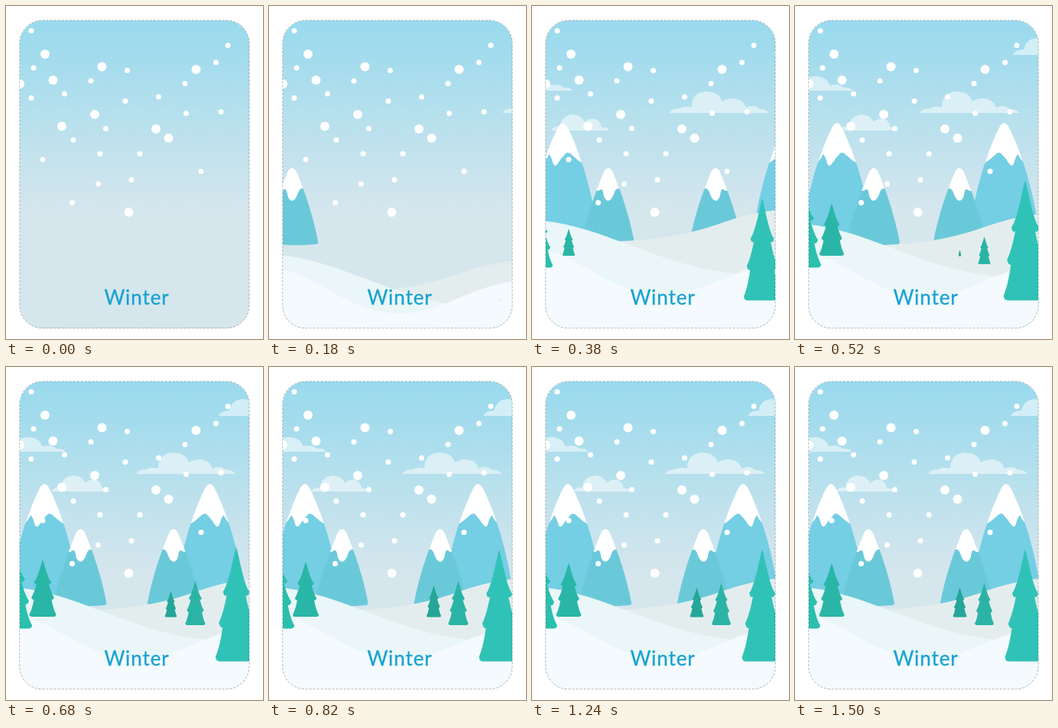
Write an HTML page that moves like this. It is 336 px wide and 436 px high and loops after 2.62 s.

```html
<!DOCTYPE html>
<html lang="en">
<head>
<meta charset="utf-8">
<title>Winter</title>
<style>
  html, body { margin: 0; width: 100%; height: 100%; overflow: hidden; background: #fff; }
  svg { display: block; width: 336px; height: 436px; }
  .cloud { fill: #fff; fill-opacity: .53; }
  .edge { fill: none; stroke: #222; stroke-opacity: .45; stroke-width: .7; stroke-dasharray: 3 2; }
  .label { font: 26px Lato, sans-serif; letter-spacing: .9px; fill: #17a2d0; stroke: #17a2d0; stroke-width: .3; stroke-linejoin: round; }
</style>
</head>
<body>
<svg viewBox="0 0 336 436">
  <defs>
    <linearGradient id="sky" gradientUnits="userSpaceOnUse" x1="0" y1="19" x2="0" y2="272">
      <stop offset="0" stop-color="#9adaee"/>
      <stop offset=".12" stop-color="#9fdbed"/>
      <stop offset="1" stop-color="#d6e6ed"/>
    </linearGradient>
    <clipPath id="card"><rect x="18" y="19" width="300" height="403" rx="30"/></clipPath>

    <path id="bigBody" d="M-46 150C-42 105 -26 45 -7 7Q0 -7 7 7C26 45 42 105 46 150Z"/>
    <clipPath id="bigClip"><use href="#bigBody"/></clipPath>
    <g id="big">
      <use href="#bigBody" fill="#74cee4"/>
      <path clip-path="url(#bigClip)" fill="#fff" d="M-34 -4H34V54H28Q20 50 13 43Q7 37 4 40Q-2 46 -7 54Q-11 59 -13 52Q-15 44 -18 41Q-22 50 -29 54H-34Z"/>
    </g>

    <path id="smallBody" d="M-34 92C-28 64 -17 32 -6 5Q0 -5 6 5C17 32 28 64 34 97Q34 100 30 100Q0 103 -34 98Z"/>
    <clipPath id="smallClip"><use href="#smallBody"/></clipPath>
    <g id="small">
      <use href="#smallBody" fill="#6ac9d9"/>
      <path clip-path="url(#smallClip)" fill="#fff" d="M-20 -4H20V27H13Q10 27 8 32Q5 42 0 43Q-4 43 -6 36Q-7 28 -9 28Q-11 28 -13 30H-20Z"/>
    </g>

    <path id="tree" d="M0 -100C10 -96 34 -68 64 -61Q58 -56 46 -58C56 -48 70 -39 84 -34Q78 -29 66 -30C74 -19 86 -10 100 -4Q98 0 80 0H-80Q-98 0 -100 -4C-86 -10 -74 -19 -66 -30Q-78 -29 -84 -34C-70 -39 -56 -48 -46 -58Q-58 -56 -64 -61C-34 -68 -10 -96 0 -100Z"/>
  </defs>

  <g clip-path="url(#card)">
    <rect x="17" y="18" width="302" height="405" fill="url(#sky)"/>

    <path class="cloud" id="cloudA" d="M10 111V97Q18 91 28 92Q40 93 44 104Q51 102 57 104Q61 105 62 107Q70 106 74 111Z"/>
    <path class="cloud" id="cloudB" d="M54 163Q57 157 66 158Q67 144 82 142Q93 142 98 152Q104 146 112 148Q119 151 120 159Q127 158 130 163Z"/>
    <path class="cloud" id="cloudC" d="M174 140Q177 134 188 134Q194 130 203 133Q203 114 221 112Q239 112 243 125Q253 119 263 122Q272 125 274 133Q284 128 292 135Q301 135 304 140Z"/>
    <path class="cloud" id="cloudD" d="M282 64Q285 57 296 57Q299 43 313 42Q328 42 333 54Q345 55 349 64Z"/>

    <use id="bigL" href="#big"/>
    <g id="bigR"><use href="#big" transform="scale(-1 1)"/></g>
    <use id="smallL" href="#small"/>
    <g id="smallR"><use href="#small" transform="scale(-1 1)"/></g>

    <g id="hills">
      <path id="hillR" fill="#e4edee" d="M18 322Q60 320 100 318C170 317 215 306 250 293Q285 281 318 277V480H18Z"/>
      <path id="hillL" fill="#eaf6f7" d="M18 289C80 296 130 325 200 345Q250 359 318 362V480H18Z"/>
      <path id="hillF" fill="#f4fafe" d="M18 325C70 335 105 382 172 382C225 382 255 350 318 340V480H18Z"/>
    </g>

    <use id="treeA" href="#tree" fill="#2bbfae"/>
    <use id="treeB" href="#tree" fill="#2ab6a6"/>
    <use id="treeC" href="#tree" fill="#25a698"/>
    <use id="treeD" href="#tree" fill="#2bb4a6"/>
    <use id="treeE" href="#tree" fill="#31c2b7"/>

    <g id="snow" fill="#fff"></g>
    <text class="label" x="171" y="391" text-anchor="middle">Winter</text>
  </g>
  <rect class="edge" x="17.7" y="18.8" width="300.4" height="403" rx="30"/>
</svg>
<script>
const LOOP = 2620, STEP = 20;
const DECAY = 6.6, FREQ = 7.72;
const $ = id => document.getElementById(id);

// Damped spring: 1 at rest before release, settling to 0.
function spring(ms) {
  if (ms <= 0) return 1;
  const s = ms / 1000, a = FREQ * s;
  return Math.exp(-DECAY * s) * (Math.cos(a) + DECAY / FREQ * Math.sin(a));
}

// Sideways entries: final x, y, starting offset, release time
const slides = {
  cloudA: [0, 0, -62, 205],
  cloudB: [0, 0, -113, 186],
  cloudC: [0, 0, 165, 105],
  cloudD: [0, 0, 62, 252],
  bigL: [47, 153, -115, 118],
  bigR: [276, 153, 162, 213],
  smallL: [96, 212, -115, 58],
  smallR: [224, 212, 140, 141]
};

// Hills rise: starting offset, release time, rate
const rises = {
  hillR: [145, 40, 1.15],
  hillL: [105, 33, 1.15],
  hillF: [60, 30, 1.15]
};

// Trees grow from the foot: x, foot y, half width, height, release time, rate
const trees = {
  treeA: [8, 342.5, 25, 102, 180, 1],
  treeB: [48, 327, 16.5, 70, 242, 1],
  treeC: [215.5, 327.5, 9, 39, 445, 1],
  treeD: [247.5, 338, 12.5, 55, 364, 1.1],
  treeE: [301, 385.5, 26.5, 146.5, 165, 1.15]
};

const flakes = [
  [6, [51,63, 61.5,97, 18,102, 125.5,79.5, 116,142, 73,157.5, 196,161, 212.5,173, 248.5,83, 160.5,270]],
  [3.5, [33,32.5, 36,81, 33,120.5, 76.5,115, 111,98, 158.5,84.5, 156,124.5, 130.5,160.5, 88,175.5,
    48,201, 123,193.5, 120.5,233, 86.5,257.5, 164,227.5, 175,193.5, 199.5,119, 235.5,140.5,
    234,101.5, 274.5,74, 290,51.5, 281,138.5, 255,216.5]]
];

for (const [r, xy] of flakes) {
  for (let i = 0; i < xy.length; i += 2) {
    const c = document.createElementNS("http://www.w3.org/2000/svg", "circle");
    c.setAttribute("cx", xy[i]);
    c.setAttribute("cy", xy[i + 1]);
    c.setAttribute("r", r);
    $("snow").append(c);
  }
}

function place(id, x, y, sx = 1, sy = 1) {
  $(id).setAttribute("transform", `translate(${x.toFixed(2)} ${y.toFixed(2)}) scale(${sx.toFixed(4)} ${sy.toFixed(4)})`);
}

function draw(t) {
  for (const id in slides) {
    const [x, y, d, start] = slides[id];
    place(id, x + d * spring(t - start), y);
  }
  for (const id in rises) {
    const [d, start, rate] = rises[id];
    place(id, 0, d * spring((t - start) * rate));
  }
  for (const id in trees) {
    const [x, y, w, h, start, rate] = trees[id];
    const k = 1 - spring((t - start) * rate);
    place(id, x, y, k * w / 100, k * h / 100);
  }
  $("hills").style.visibility = t < 60 ? "hidden" : "visible";
}

const begin = performance.now();
function tick() {
  const t = (performance.now() - begin) % LOOP;
  draw(Math.floor(t / STEP) * STEP);
  requestAnimationFrame(tick);
}
tick();
</script>
</body>
</html>
```
